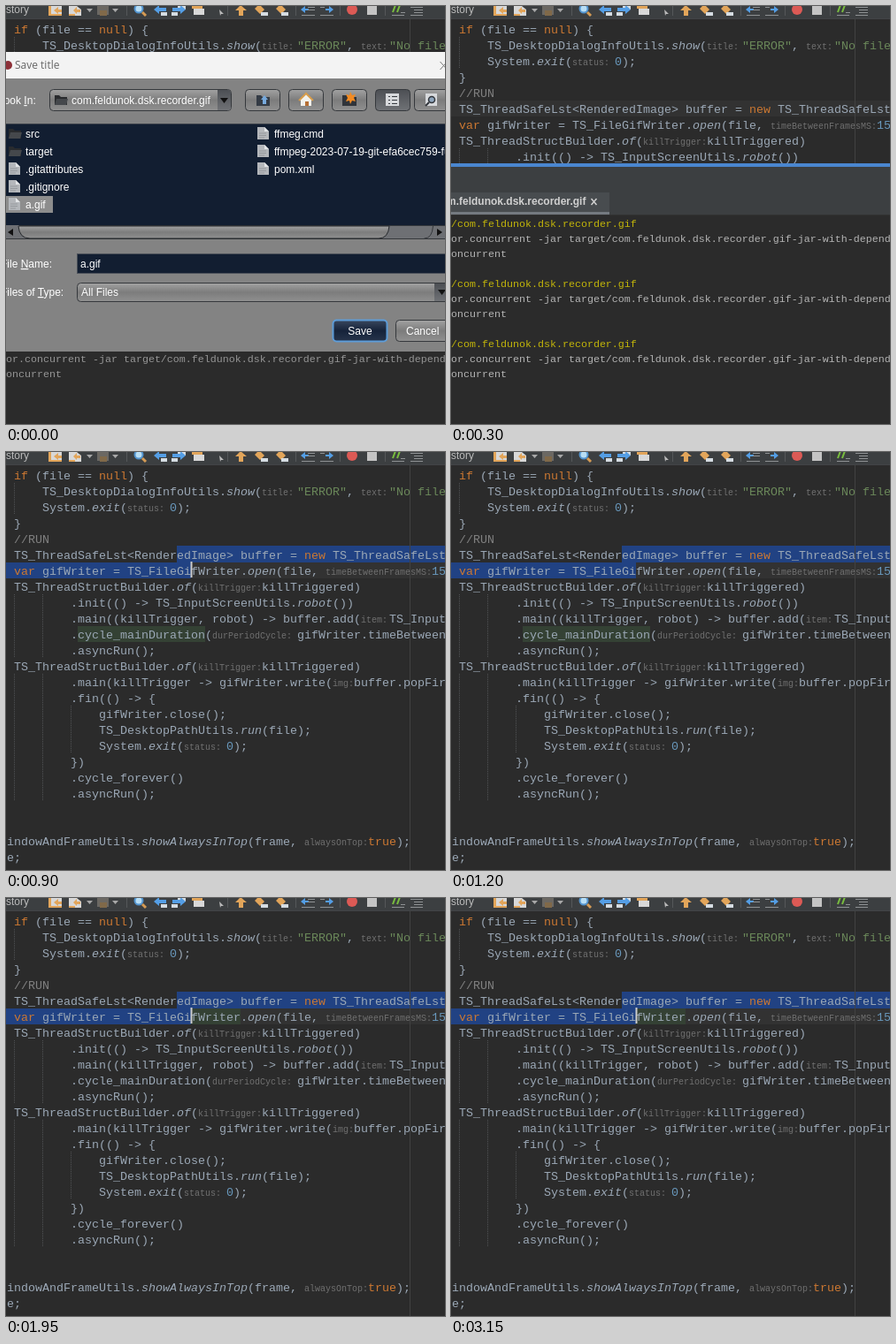
These frames come from a looping animation (496 by 473 pixels, 3300 ms). An HTML page:

```html
<!DOCTYPE html>
<html lang="en">
<head>
<meta charset="utf-8">
<title>Save dialog over a code editor</title>
<style>
html, body { margin: 0; width: 100%; height: 100%; overflow: hidden; background: #2b2b2b; }
svg { display: block; }
text { white-space: pre; }
.code { font: 13.33px "Liberation Mono", monospace; fill: #9ba8b6; }
.code .key { fill: #cc7832; }
.code .call { font-style: italic; }
.code .hint { font-size: 10px; fill: #707070; }
.code .string { fill: #6a8759; }
.code .number { fill: #6897bb; }
.code .comment { fill: #808080; }
.term { font: 11.665px "Liberation Mono", monospace; fill: #b4b4b4; }
.term .path { fill: #c2b50a; }
.ui { font: 12px "Liberation Sans", Arial, sans-serif; fill: #fff; }

#dialog, #terminal, #line, #selection, #oldMark, #newMark, #caret, #hover, .dim {
  animation: 3300ms step-end infinite;
}
#dialog { animation-name: dialog; }
#terminal { animation-name: terminal; }
.dim { animation-name: wake; }
#line { animation-name: line; }
#selection { animation-name: selection; }
#oldMark { animation-name: oldMark; }
#newMark { animation-name: newMark; }
#caret { animation-name: caret; }
#hover { animation-name: hover; }
@keyframes dialog { 0% { visibility: visible } 4.545%, 100% { visibility: hidden } }
@keyframes terminal { 0% { visibility: visible } 22.727%, 100% { visibility: hidden } }
@keyframes wake { 0% { opacity: .78 } 4.545%, 100% { opacity: 1 } }
@keyframes line { 0% { transform: none } 27.272%, 100% { transform: translateY(18px) } }
@keyframes selection { 0% { visibility: hidden } 27.272%, 100% { visibility: visible } }
@keyframes oldMark { 0% { visibility: visible } 54.545%, 100% { visibility: hidden } }
@keyframes newMark { 0% { visibility: hidden } 54.545%, 100% { visibility: visible } }
@keyframes caret {
  0%, 36.363%, 50%, 68.181%, 86.363% { visibility: hidden }
  27.272%, 45.454%, 59.09%, 77.272%, 95.454%, 100% { visibility: visible }
}
@keyframes hover { 0%, 90.909%, 100% { visibility: hidden } 86.363% { visibility: visible } }
</style>
</head>
<body>
<svg width="496" height="473" viewBox="0 0 496 473">
  <defs>
    <linearGradient id="metal" x2="0" y2="1">
      <stop offset="0" stop-color="#a2a2a2"/><stop offset=".5" stop-color="#7c7c7c"/><stop offset="1" stop-color="#909090"/>
    </linearGradient>
    <linearGradient id="pressed" x2="0" y2="1">
      <stop offset="0" stop-color="#4c4f54"/><stop offset="1" stop-color="#707276"/>
    </linearGradient>
    <linearGradient id="navy" x2="0" y2="1">
      <stop offset="0" stop-color="#39475e"/><stop offset=".5" stop-color="#16233a"/><stop offset="1" stop-color="#26344b"/>
    </linearGradient>
    <g id="folder">
      <path d="M0 2h5l2 2h7v9H0z" fill="#292b2e"/><path d="M2 6h13l-2 7H0z" fill="#45484c"/>
    </g>
    <g id="file">
      <path d="M0 0h8l5 5v9H0z" fill="#b4b7bb"/><path d="M8 0v5h5z" fill="#e4e6e8"/>
      <path d="M2 7h8M2 9.500h8M2 12h6" stroke="#96999d"/>
    </g>
  </defs>

  <rect width="496" height="473" fill="#2b2b2b"/>
  <rect id="line" y="107" width="496" height="18" fill="#323232"/>
  <g id="selection" fill="#214283">
    <rect x="193" y="106" width="303" height="19"/>
    <rect y="125" width="209" height="18"/>
  </g>
  <rect id="oldMark" x="81" y="197" width="144" height="18" fill="#344134"/>
  <rect id="newMark" x="209" y="125" width="56" height="18" fill="#344134"/>
  <path d="M9.500 35v36M9.500 161v72M41.500 161v72M9.500 251v144M41.500 251v144M73.500 287v54"
    stroke="#505254" stroke-dasharray="1"/>
  <path d="M456.500 14V473" stroke="#424242"/>
  <g id="code" class="code"></g>
  <rect id="caret" x="208.500" y="124" width="2" height="18" fill="#ccc"/>

  <!-- toolbar -->
  <rect width="496" height="14" fill="#3c3f41"/>
  <rect y="14" width="496" height="1" fill="#424446"/>
  <rect id="hover" width="35" height="14" fill="#4c5052"/>
  <text class="ui" y="8" style="fill:#bbb">story</text>
  <path d="M136.500 0v11M250.500 0v11M327.500 0v11M377.500 0v11M428.500 0v11" stroke="#555759"/>
  <g fill="#d8d8d8">
    <path d="M50 0h13v11H50zM71 0h9l5 4v7H71zM212 3h12v7h-12z"/>
    <path d="M103 0h13v10h-13z" fill="#6b6863"/>
    <path d="M241 4l5 5h-3l-1 2z" fill="#bbb"/>
  </g>
  <g fill="#e2a55a">
    <path d="M48 0h3v11h-3zM51 9h12v2H51zM54 5l5-4v3h4v3h-4v2z"/>
    <path d="M76 5l4-4v3h4v3h-4v2zM71 9h7v2h-7zM210 0h12v3h-12z"/>
    <path d="M106 5h8v6h-8z" fill="#806949"/>
    <path d="M259 5l6-6 7 6h-4v6h-5V5z"/>
    <path d="M281 3l5-5 6 6-5 5zM305 3l5-5 6 6-5 5z"/>
  </g>
  <path d="M91 3h7l-3.500 4zM120 3h7l-3.500 4z" fill="#a8a8a8"/>
  <circle cx="150" cy="3" r="4.500" fill="#b8def5" stroke="#5294cf" stroke-width="2"/>
  <path d="M154 7l4 4" stroke="#d49b55" stroke-width="3"/>
  <path d="M175 7h7v4h-7zM187 7h7v4h-7zM288 7h8v4h-8zM311 7h8v4h-8zM194 0h9v4h-9z" fill="#d5dce2"/>
  <g fill="#549ee5">
    <path d="M167 4l6-5v3h8v4h-8v3zM203 4l-6-5v3h-9v4h9v3z"/>
    <path d="M333 4l5-4v3h4v2h-4v3zM370 4l-5-4v3h-4v2h4v3z"/>
  </g>
  <path d="M341 1.500h8M341 4.500h8M334 10.500h15M355 1.500h5M355 10.500h15M457 1.500h14M461 4.500h10M461 7.500h10M457 10.500h14" stroke="#8f9294"/>
  <circle cx="391" cy="4" r="6" fill="#dc5a55"/>
  <rect x="408" y="-1" width="11" height="11" fill="#c4c4c4"/>
  <path d="M437 7l3-8M442 7l3-8" stroke="#79bd3f" stroke-width="2"/>
  <path d="M436 10.500h14M446 7.500h5" stroke="#8f9294"/>

  <!-- output panel -->
  <g id="terminal">
    <rect y="178" width="496" height="295" fill="#2b2b2b"/>
    <rect y="178" width="496" height="4" fill="#4a86cf"/>
    <rect y="182" width="496" height="55" fill="#3c3f41"/>
    <rect y="211" width="179" height="23" fill="#484c4f"/>
    <rect y="233" width="179" height="3" fill="#747a80"/>
    <path d="M0 236.500H496" stroke="#323232"/>
    <text class="ui" x="-5" y="225" style="font-weight:bold;fill:#d0d0d0">m.feldunok.dsk.recorder.gif</text>
    <path d="M158.500 218l6 7m0-7l-6 7" stroke="#d0d0d0" stroke-width="1.500"/>
    <g id="log" class="term dim"></g>
  </g>

  <!-- save dialog -->
  <g id="dialog" class="ui">
    <rect y="52" width="496" height="339" fill="#838383"/>
    <rect y="52" width="496" height="30" fill="#f3f3f3"/>
    <circle cx="2" cy="67" r="5" fill="#8d3038"/>
    <text x="10" y="71" style="font-family:'Open Sans',sans-serif;fill:#666">Save title</text>
    <path d="M490.500 63l8 9m0-9l-8 9" stroke="#777"/>
    <text x="-9" y="111">Look <tspan text-decoration="underline">I</tspan>n:</text>
    <g id="buttons" stroke="#35383c"></g>
    <path d="M239 95h12q3 0 3 3v17q0 3-3 3h-12z" fill="url(#pressed)"/>
    <path d="M242 104h9l-4.500 6z" fill="#111"/>
    <use href="#folder" x="55" y="99"/>
    <text x="74" y="111">com.feldunok.dsk.recorder.gif</text>
    <!-- button pictures -->
    <path d="M283 101h5l2 2h8v10h-15z" fill="#343b45"/>
    <path d="M288 106l4-5 4 5h-2v5h-4v-5z" fill="#77a9dc"/>
    <path d="M331 107l8-8 8 8h-2v6h-12v-6z" fill="#f1f1ed"/>
    <path d="M331 107l8-8 8 8" fill="none" stroke="#d79c4a" stroke-width="2"/>
    <path d="M338 108h4v5h-4z" fill="#b66f35"/>
    <path d="M380 101h5l2 2h9v10h-16z" fill="#30343a"/>
    <path d="M389 97l2 4 4-1-2 4 2 4-4-1-2 4-1-4-4 1 2-4-2-4 4 1z" fill="#f28b22"/>
    <path d="M429 99h15v14h-15z" fill="#d7d9dc"/>
    <path d="M432 102.500h2m2 0h6M432 106.500h2m2 0h6M432 110.500h2m2 0h6" stroke="#34383e"/>
    <path d="M474 99h13v14h-13z" fill="#d7d9dc"/>
    <circle cx="481" cy="106" r="3.500" fill="#8fa6bd" stroke="#30343a" stroke-width="1.500"/>
    <path d="M478 109l-4 4" stroke="#30343a" stroke-width="2"/>

    <rect y="133" width="496" height="115" fill="#121e31"/>
    <path d="M0 133.500H496" stroke="#3b4049"/>
    <rect y="215" width="53" height="19" fill="#8d8d8d"/>
    <g id="files"></g>

    <rect y="248" width="496" height="16" fill="#6e7074"/>
    <path d="M15 248.500H496M0 263.500H496" stroke="#35383c"/>
    <path d="M14 249H433q-1 14-12 14H27q-12 0-13-14z" fill="url(#metal)" stroke="#24272b"/>
    <path d="M482.500 249q-1 14-10 14" fill="none" stroke="#35383c"/>
    <path d="M8 252v8l-6-4zM487 252v8l6-4z" fill="#111"/>

    <text x="-6" y="296">File <tspan text-decoration="underline">N</tspan>ame:</text>
    <rect x="80.500" y="280.500" width="430" height="22" fill="#121e31" stroke="#4b5059"/>
    <text x="84" y="296">a.gif</text>
    <text x="-6" y="328">Files of <tspan text-decoration="underline">T</tspan>ype:</text>
    <path d="M484 314h12v20h-12z" fill="url(#pressed)"/>
    <path d="M488 321h9l-4.500 6z" fill="#111"/>
    <text x="85" y="328">All Files</text>
    <rect x="369.500" y="355.500" width="61" height="24" rx="4" fill="url(#navy)" stroke="#5d9cd8" stroke-width="2"/>
    <text x="400" y="372" text-anchor="middle">Save</text>
    <text x="452" y="372">Cancel</text>
  </g>
</svg>
<script>
const byId = id => document.getElementById(id);

function add(parent, tag, attrs, content = "") {
  const node = document.createElementNS("http://www.w3.org/2000/svg", tag);
  for (const name in attrs) node.setAttribute(name, attrs[name]);
  node.textContent = content;
  byId(parent).append(node);
}

// Each marker encloses text of one style
const styles = { "^": "key", "*": "call", "~": "hint", "#": "string", "@": "number", "%": "comment" };
const source = `
^if^ (file == ^null^) {
    TS_DesktopDialogInfoUtils.*show*(~title:~#"ERROR"#, ~text:~#"No file#
    System.*exit*(~status:~@0@);
}
%//RUN%
TS_ThreadSafeLst<RenderedImage> buffer = ^new^ TS_ThreadSafeLst
^var^ gifWriter = TS_FileGifWriter.*open*(file, ~timeBetweenFramesMS:~@15@
TS_ThreadStructBuilder.*of*(~killTrigger:~killTriggered)
        .init(() -> TS_InputScreenUtils.*robot*())
        .main((killTrigger, robot) -> buffer.add(~item:~TS_Input
        .cycle_mainDuration(~durPeriodCycle:~gifWriter.timeBetween
        .asyncRun();
TS_ThreadStructBuilder.*of*(~killTrigger:~killTriggered)
        .main(killTrigger -> gifWriter.write(~img:~buffer.popFir
        .fin(() -> {
            gifWriter.close();
            TS_DesktopPathUtils.*run*(file);
            System.*exit*(~status:~@0@);
        })
        .cycle_forever()
        .asyncRun();


indowAndFrameUtils.*showAlwaysInTop*(frame, ~alwaysOnTop:~^true^);
e;`.slice(1).split("\n");

source.forEach((line, row) => {
  let x = row > 22 ? 1 : 9;
  for (const [part] of line.matchAll(/([\^*~#@%]).*?\1|[^\^*~#@%]+/g)) {
    const style = styles[part[0]];
    const content = style ? part.slice(1, -1) : part;
    add("code", "text", { x, y: 31 + row * 18, class: style || "" }, content);
    // hints are padded to a whole number of 8px columns
    x += 8 * (style === "hint" ? Math.ceil(content.length * 0.75) : content.length);
  }
});

const project = "com.feldunok.dsk.recorder.gif";
for (let y = 250; y < 400; y += 68) {
  add("log", "text", { x: 0, y, class: "path" }, "/" + project);
  add("log", "text", { x: 0, y: y + 17 }, `or.concurrent -jar target/${project}-jar-with-depend`);
  add("log", "text", { x: 0, y: y + 34 }, "oncurrent");
}

const button = (x, y, width, height, fill = "metal") =>
  add("buttons", "rect", { x: x + .5, y: y + .5, width, height, rx: 4, fill: `url(#${fill})` });
button(49, 94, 205, 24);
for (let i = 0; i < 5; i++) button(i < 4 ? 270 + i * 49 : 461, 94, 39, 24, i === 3 ? "pressed" : "metal");
button(80, 313, 430, 21);
button(440, 355, 61, 24);

function listFiles(x, names) {
  names.forEach((name, row) => {
    const y = 145 + row * 20;
    const icon = /^(src|target)$/.test(name) ? "folder" : "file";
    add("files", "use", { href: "#" + icon, x, y: y - 8 });
    add("files", "text", { x: x + 19, y: y + 4 }, name);
  });
}
listFiles(3, ["src", "target", ".gitattributes", ".gitignore", "a.gif"]);
listFiles(284, ["ffmeg.cmd", "ffmpeg-2023-07-19-git-efa6cec759-fu", "pom.xml"]);
</script>
</body>
</html>
```
